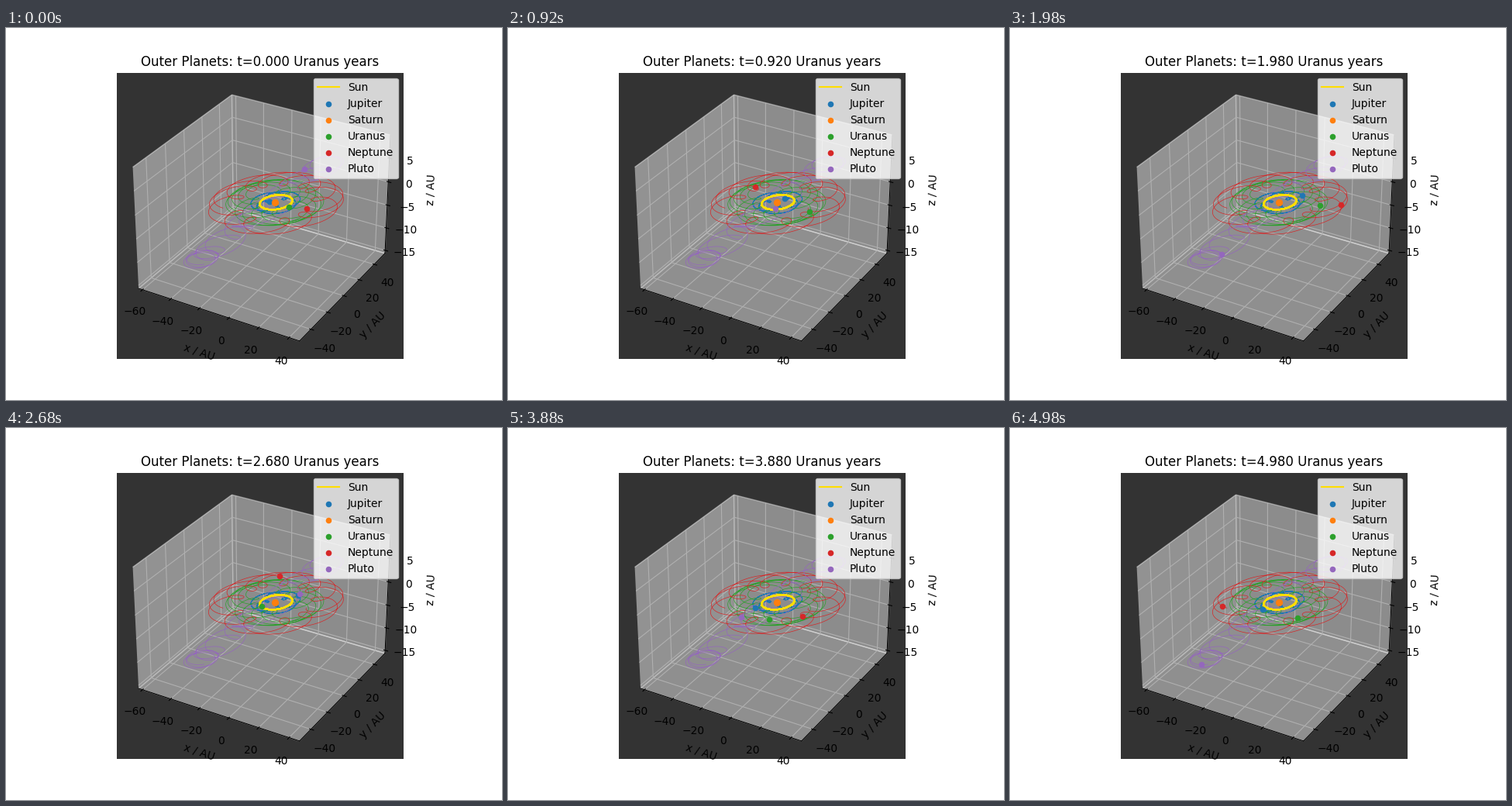
Write a matplotlib script that moves like this. It is 640 px wide and 480 px high and loops after 5 s.

```python
import matplotlib.pyplot as plt
import numpy as np
from matplotlib.animation import FuncAnimation
from mpl_toolkits.mplot3d import proj3d

W, H, DPI = 640, 480, 100
FRAMES, STEP = 250, 0.02
SUN = "#ffdd00"

# name: semi-major axis (AU), eccentricity, inclination (deg), period (yr), colour
PLANETS = {
    "Jupiter": (5.202, 0.048, 1.31, 11.861, "tab:blue"),
    "Saturn": (9.576, 0.053, 2.49, 29.628, "tab:orange"),
    "Uranus": (19.293, 0.043, 0.77, 84.747, "tab:green"),
    "Neptune": (30.246, 0.010, 1.77, 166.344, "tab:red"),
    "Pluto": (39.509, 0.248, 17.5, 248.348, "tab:purple"),
}
CENTRE = "Saturn"
UNIT = PLANETS["Uranus"][3]


def orbit(name, t):
    """Heliocentric position at time t, in Uranus years."""
    a, e, tilt, period, _ = PLANETS[name]
    mean = 2 * np.pi * t * UNIT / period
    ecc = mean + e * np.sin(mean)
    for _ in range(8):
        ecc = ecc - (ecc - e * np.sin(ecc) - mean) / (1 - e * np.cos(ecc))
    x = a * (np.cos(ecc) - e)
    y = a * np.sqrt(1 - e * e) * np.sin(ecc)
    beta = np.radians(tilt)
    return np.array([x * np.cos(beta), y, x * np.sin(beta)])


def relative(name, t):
    return orbit(name, t) - orbit(CENTRE, t)


fig = plt.figure(figsize=(W / DPI, H / DPI), dpi=DPI)

# The box and the trails never change, so they are rendered once.
box = fig.add_subplot(projection="3d", facecolor="#333333")
box.view_init(elev=30, azim=-60)
trail = np.linspace(0, FRAMES * STEP, 5001)
for name, (*_, color) in PLANETS.items():
    if name != CENTRE:
        box.plot(*relative(name, trail), color=color, lw=0.5)
box.plot(*-orbit(CENTRE, trail), color=SUN, lw=1.5)
box.set(xlabel="x / AU", ylabel="y / AU", zlabel="z / AU")
fig.canvas.draw()
backdrop = np.asarray(fig.canvas.buffer_rgba()).copy()

# Screen path and depth of every planet
times = np.arange(FRAMES) * STEP
paths, depths = {}, {}
for name in PLANETS:
    px, py, depth = proj3d.proj_transform(*relative(name, times), box.get_proj())
    paths[name] = box.transData.transform(np.column_stack([px, py]))
    depths[name] = np.asarray(depth)
frame_box = box.get_position()
box.remove()

ax = fig.add_axes([0, 0, 1, 1])
ax.axis("off")
ax.imshow(backdrop, extent=(0, W, 0, H), aspect="auto", interpolation="nearest")
ax.set(xlim=(0, W), ylim=(0, H))

ax.plot([], [], color=SUN, lw=1.5, label="Sun")
dots = {
    name: ax.scatter(*paths[name][0], s=32 if name == CENTRE else 20,
                     color=color, label=name)
    for name, (*_, color) in PLANETS.items()
}
legend = ax.legend(loc="upper right", bbox_to_anchor=frame_box,
                   bbox_transform=fig.transFigure)
legend.set_zorder(20)
legend.legend_handles[2].set_sizes([20])
title = ax.text(W * (frame_box.x0 + frame_box.x1) / 2,
                H * frame_box.y1 + 6 * DPI / 72, "",
                size=12, ha="center", va="baseline")


def update(i):
    for name, dot in dots.items():
        dot.set_offsets(paths[name][i])
        dot.set_zorder(10 - depths[name][i])
    title.set_text(f"Outer Planets: t={times[i]:.3f} Uranus years")
    return [*dots.values(), title]


anim = FuncAnimation(fig, update, frames=FRAMES, interval=20,
                     repeat=True, repeat_delay=0, blit=False)
plt.show()
```
